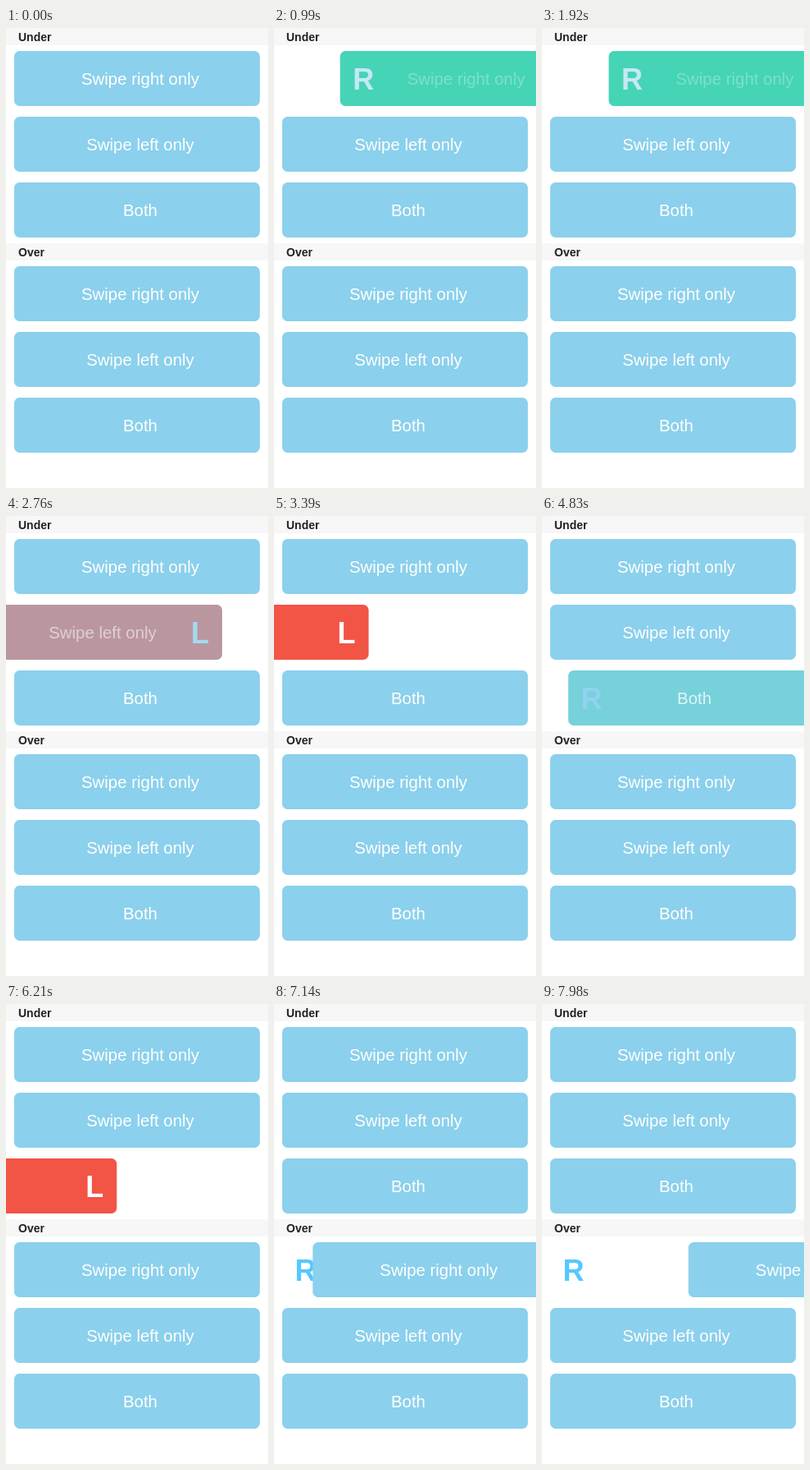
Animation, 320 px wide and 560 px high, one loop 8 s. Source, as an HTML page:

```html
<!DOCTYPE html>
<html lang="en">
<head>
<meta charset="utf-8">
<title>Swipe cells</title>
<style>
  html, body { margin: 0; width: 100%; height: 100%; overflow: hidden; background: #fff; }
  svg { display: block; width: 320px; height: 560px; font-family: "Liberation Sans", Arial, sans-serif; }
  .head { font-size: 14px; font-weight: bold; fill: #222; }
  .label { font-size: 20.4px; fill: #fff; text-anchor: middle; }
  .icon { font-size: 36px; font-weight: bold; }
</style>
</head>
<body>
<svg id="stage" viewBox="0 0 320 560"></svg>
<script>
const LOOP = 8000, STEP = 30, RETURN = 360, FADE = 100;
const BLUE = [139, 208, 236], GREEN = [42, 213, 160], RED = [242, 84, 69], WHITE = [255, 255, 255];

// Drag from start to end, hold until release, then slide back.
const swipes = [
  { row: 0, start: 795, end: 1712, release: 1712, reach: 186 },
  { row: 1, start: 2685, end: 3330, release: 3330, reach: -210 },
  { row: 2, start: 4215, end: 4554, release: 4554, reach: 160 },
  { row: 2, start: 5385, end: 6120, release: 6120, reach: -207 },
  { row: 3, start: 7065, end: 7830, release: 7890, reach: 200 }
];

const stage = document.getElementById('stage');

function add(parent, tag, attrs, text = '') {
  const el = document.createElementNS('http://www.w3.org/2000/svg', tag);
  for (const key in attrs) el.setAttribute(key, attrs[key]);
  el.textContent = text;
  return parent.appendChild(el);
}

const clamp = v => Math.min(1, Math.max(0, v));
const smooth = v => v * v * (3 - 2 * v);
const mix = (a, b, p) => `rgb(${a.map((v, i) => Math.round(v + (b[i] - v) * p))})`;

function addHeader(y, title) {
  add(stage, 'rect', { y, width: 320, height: 21, fill: '#f7f7f7' });
  add(stage, 'text', { x: 15, y: y + 15.5, class: 'head' }, title);
}

function addIcon(parent, y, letter) {
  const right = letter === 'L';
  return add(parent, 'text', {
    x: right ? 294 : 25.5, y: y + 46.5, class: 'icon', fill: '#55c8ff',
    'text-anchor': right ? 'end' : 'start'
  }, letter);
}

function addRow(y, title, under) {
  if (!under) addIcon(stage, y, 'R');
  const card = add(stage, 'g', {});
  const face = add(card, 'rect', { x: 10, y, width: 300, height: 67, rx: 6.5 });
  const label = add(card, 'text', { x: 164, y: y + 41, class: 'label' }, title);
  const icons = under ? { R: addIcon(card, y, 'R'), L: addIcon(card, y, 'L') } : null;
  return { card, face, label, icons };
}

const titles = ['Swipe right only', 'Swipe left only', 'Both'];
const rows = [];
[['Under', 0, 28], ['Over', 262, 290]].forEach(([name, headY, top]) => {
  addHeader(headY, name);
  titles.forEach((title, i) => rows.push(addRow(top + 80 * i, title, name === 'Under')));
});

function offsetAt(swipe, t) {
  const drag = 1 - (1 - clamp((t - swipe.start) / (swipe.end - swipe.start))) ** 2;
  const back = smooth(clamp((t - swipe.release) / RETURN));
  return swipe.reach * drag * (1 - back);
}

function pose({ card, face, label, icons }, offset) {
  const p = icons ? clamp(Math.abs(offset) / FADE) : 0;
  card.setAttribute('transform', `translate(${offset.toFixed(1)} 0)`);
  face.setAttribute('fill', mix(BLUE, offset > 0 ? GREEN : RED, p));
  label.setAttribute('opacity', 1 - p);
  if (!icons) return;
  icons.R.setAttribute('opacity', offset > 0 ? 1 : 0);
  icons.L.setAttribute('opacity', offset < 0 ? 1 : 0);
  for (const icon of Object.values(icons)) icon.setAttribute('fill', mix(BLUE, WHITE, p * p));
}

function draw(now) {
  const t = Math.floor((now % LOOP) / STEP) * STEP;
  rows.forEach((row, i) => pose(row, swipes
    .filter(s => s.row === i)
    .reduce((sum, s) => sum + offsetAt(s, t), 0)));
}

let begin;
function tick(now) {
  begin ??= now;
  draw(now - begin);
  requestAnimationFrame(tick);
}
draw(0);
requestAnimationFrame(tick);
</script>
</body>
</html>
```
